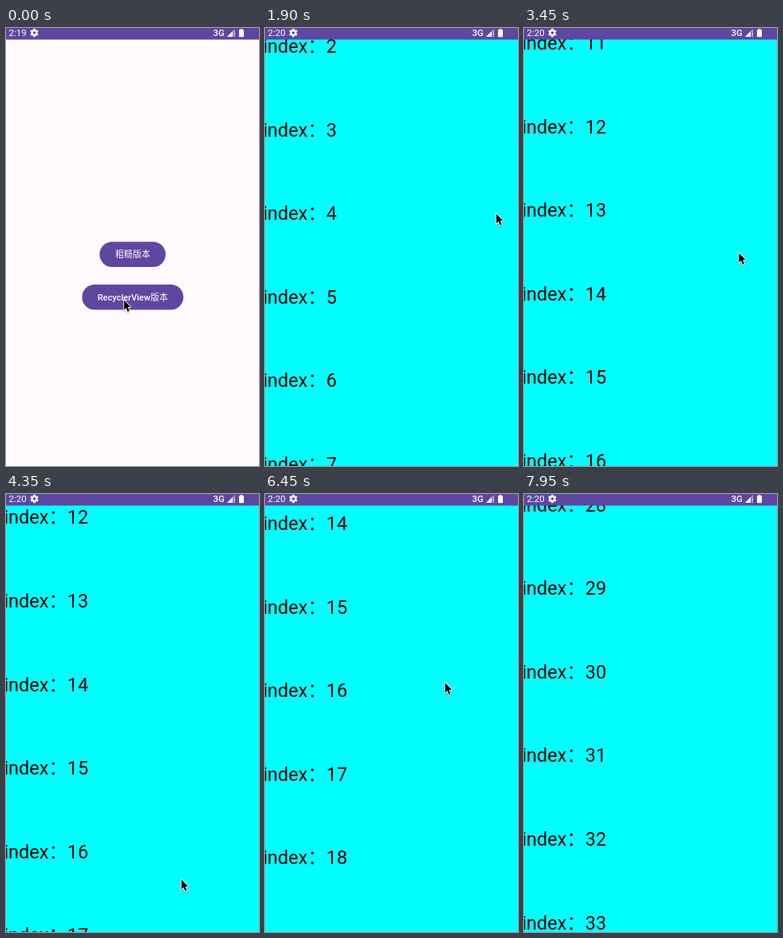
Write an HTML page with a canvas that moves like this. It is 317 by 548 pixels and loops after 8 s.

```html
<!DOCTYPE html>
<html lang="zh-CN">
<head>
<meta charset="utf-8">
<title>List scrolling</title>
<style>
html, body { margin: 0; width: 100%; height: 100%; overflow: hidden; background: #fffbff; }
canvas { display: block; width: 317px; height: 548px; }
</style>
</head>
<body>
<canvas id="stage"></canvas>
<script>
const W = 317, H = 548, BAR = 14.5, LOOP = 8000, ROW = 104.6;
const PURPLE = '#6046a0', PAGE = '#fffbff', CYAN = '#00ffff';
const FONTS = 'Roboto, "Noto Sans CJK SC", "Noto Sans CJK", sans-serif';

const canvas = document.getElementById('stage');
const ctx = canvas.getContext('2d');
const dpr = window.devicePixelRatio || 1;
canvas.width = W * dpr;
canvas.height = H * dpr;

const progress = (t, at, span) => Math.max(0, Math.min(1, (t - at) / span));
const easeOut = p => 1 - Math.pow(1 - p, 3);
const easeInOut = p => p * p * (3 - 2 * p);

// A swipe starts at a time, takes a span and moves the list by a distance
const swipes = [
  { at: 1350, span: 1000, by: -426 },
  { at: 2700, span: 1100, by: -1004 },
  { at: 3960, span: 1667, by: 1040.6 },
  { at: 5750, span: 1100, by: -1566 },
  { at: 6600, span: 1600, by: -1090 }
];

const pointerMoves = [
  { at: 400, span: 600, dx: 134, dy: 138 },
  { at: 1350, span: 550, dx: 8, dy: -246 },
  { at: 1950, span: 400, dx: -6, dy: 209 },
  { at: 2700, span: 750, dx: -14.5, dy: -160 },
  { at: 3500, span: 850, dx: -49.5, dy: 201 },
  { at: 4400, span: 1200, dx: -29.5, dy: -23.5 },
  { at: 5750, span: 350, dx: 25, dy: -240 },
  { at: 6200, span: 850, dx: 49.5, dy: 82.5 },
  { at: 7150, span: 700, dx: -2, dy: 260 }
];

// Start value plus every eased move so far
const travel = (t, from, moves, key) => moves.reduce(
  (sum, m) => sum + m[key] * easeInOut(progress(t, m.at, m.span)), from);

function text(str, x, y, size, color, weight = 400, align = 'left') {
  ctx.font = `${weight} ${size}px ${FONTS}`;
  ctx.textAlign = align;
  ctx.fillStyle = color;
  ctx.fillText(str, x, y);
}

function polygon(points) {
  ctx.beginPath();
  points.forEach(([x, y]) => ctx.lineTo(x, y));
  ctx.closePath();
}

function disc(x, y, r, color) {
  ctx.fillStyle = color;
  ctx.beginPath();
  ctx.arc(x, y, r, 0, 7);
  ctx.fill();
}

function button(x, y, w, h, label, ripple = 0, fade = 0) {
  ctx.save();
  ctx.beginPath();
  ctx.roundRect(x, y, w, h, h / 2);
  ctx.fillStyle = PURPLE;
  ctx.fill();
  if (ripple > 0) {
    ctx.clip();
    disc(x + w / 2, y + h / 2, ripple * w * 0.55, `rgba(255,255,255,${0.2 * (1 - fade)})`);
  }
  ctx.restore();
  text(label, x + w / 2, y + h / 2 + 4.2, 11, '#fff', 500, 'center');
}

function drawMenu(t) {
  ctx.fillStyle = PAGE;
  ctx.fillRect(0, 0, W, H);
  button(117.3, 267.5, 82.7, 31.5, '粗糙版本');
  button(95.3, 321, 127, 31.5, 'RecyclerView版本',
    easeOut(progress(t, 20, 280)), progress(t, 300, 250));
}

function drawList(t) {
  ctx.fillStyle = CYAN;
  ctx.fillRect(0, 0, W, H);
  const top = travel(t, 59, swipes, 'by');
  const first = Math.max(0, Math.floor(-top / ROW));
  for (let n = first; n < first + 7; n++) {
    text('index：' + n, -2.6, top + n * ROW + 8.3, 23.48, '#000');
  }
}

function drawGear(x, y) {
  ctx.save();
  ctx.translate(x, y);
  ctx.fillStyle = '#fff';
  for (let i = 0; i < 6; i++) {
    ctx.fillRect(-1.4, -5.2, 2.8, 3);
    ctx.rotate(Math.PI / 3);
  }
  disc(0, 0, 3.9, '#fff');
  disc(0, 0, 1.8, PURPLE);
  ctx.restore();
}

function drawSignal(x, y, size) {
  const wedge = (s, color) => {
    polygon([[x, y], [x + s, y - s], [x + s, y]]);
    ctx.fillStyle = color;
    ctx.fill();
  };
  wedge(size, 'rgba(255,255,255,.45)');
  wedge(size * 0.7, '#fff');
  ctx.fillStyle = PURPLE;
  ctx.fillRect(x + size - 2.6, y - 6, 2.6, 6);
  ctx.fillStyle = '#fff';
  ctx.fillRect(x + size - 1.5, y - 5.5, 1.3, 3.4);
  ctx.fillRect(x + size - 1.5, y - 1.3, 1.3, 1.3);
}

function drawBattery(x, y) {
  ctx.fillStyle = '#fff';
  ctx.beginPath();
  ctx.roundRect(x, y + 1, 6, 9.2, 0.8);
  ctx.fill();
  ctx.fillRect(x + 1.7, y, 2.6, 1.5);
}

function drawStatus(t) {
  ctx.fillStyle = PURPLE;
  ctx.fillRect(0, 0, W, BAR);
  text(t < 950 ? '2:19' : '2:20', 3.5, 10.4, 11.6, '#fff');
  drawGear(35.5, 6);
  text('3G', 259.5, 10.2, 11.4, '#fff', 500);
  drawSignal(277, 11, 10);
  drawBattery(292, 1);
}

function drawPointer(t) {
  ctx.save();
  ctx.translate(travel(t, 147, pointerMoves, 'dx'), travel(t, 339, pointerMoves, 'dy'));
  ctx.scale(0.92, 0.95);
  polygon([[0.9, 1.5], [0.9, 14.6], [3.8, 11.7], [6, 16.9], [8.2, 15.9],
    [6, 10.8], [10, 10.6]]);
  ctx.lineJoin = 'round';
  ctx.lineWidth = 2;
  ctx.strokeStyle = '#fff';
  ctx.shadowColor = 'rgba(0,0,0,.3)';
  ctx.shadowBlur = 2 * dpr;
  ctx.shadowOffsetY = dpr;
  ctx.stroke();
  ctx.shadowColor = 'transparent';
  ctx.fillStyle = '#000';
  ctx.fill();
  ctx.restore();
}

function draw(t) {
  ctx.setTransform(dpr, 0, 0, dpr, 0, 0);
  ctx.fillStyle = PAGE;
  ctx.fillRect(0, 0, W, H);

  const slide = easeOut(progress(t, 350, 450));
  if (slide < 1) {
    ctx.save();
    ctx.translate(-W * 0.1 * slide, 0);
    drawMenu(t);
    ctx.restore();
  }
  if (slide > 0) {
    ctx.save();
    ctx.globalAlpha = progress(t, 390, 90);
    ctx.translate(W * 0.1 * (1 - slide), 0);
    drawList(t);
    ctx.restore();
  }
  drawStatus(t);
  drawPointer(t);
}

const start = performance.now();
function frame() {
  draw((performance.now() - start) % LOOP);
  requestAnimationFrame(frame);
}
frame();
</script>
</body>
</html>
```
